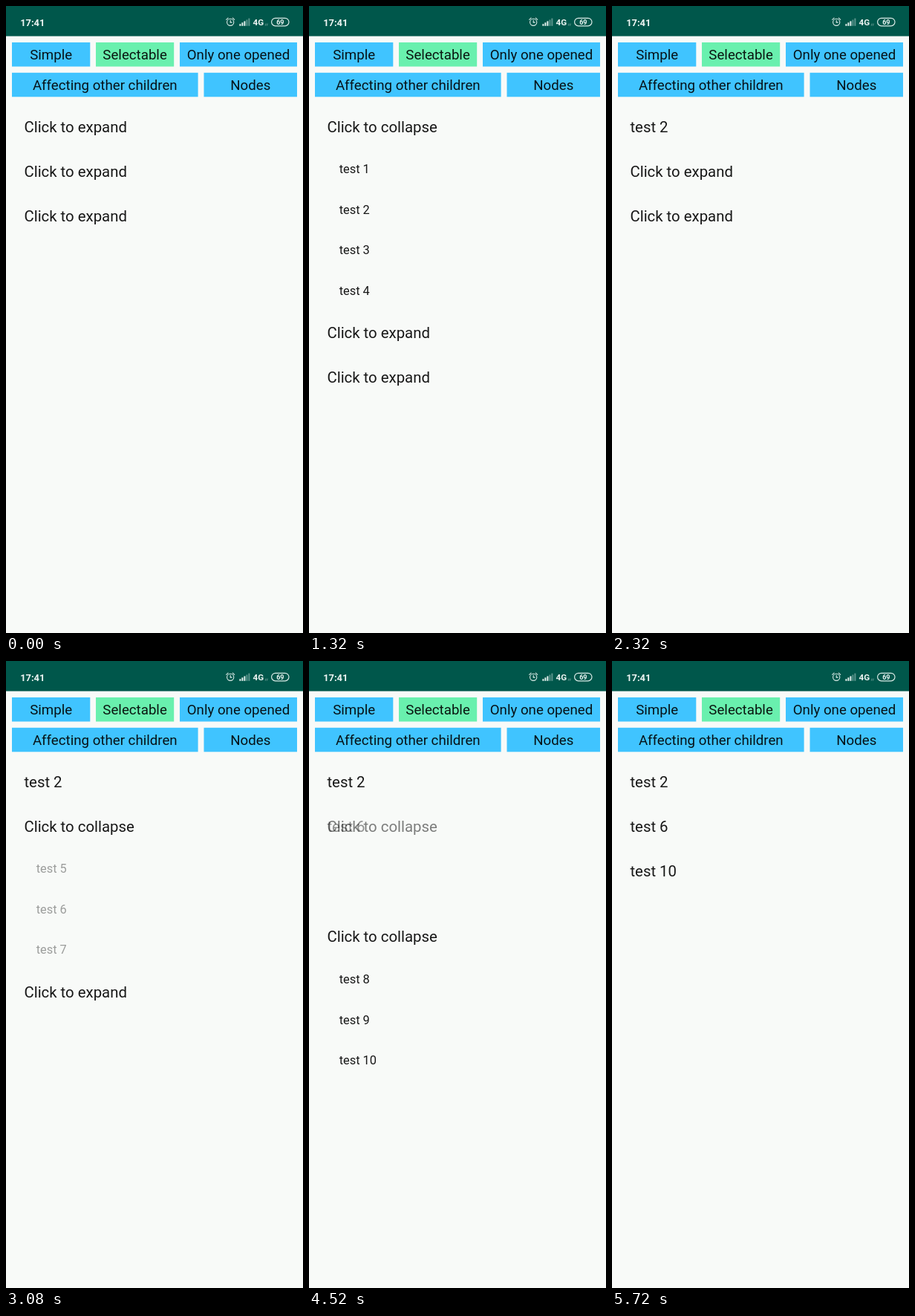
An HTML page for the animation above (7080 ms loop, 400x844 px).

```html
<!DOCTYPE html>
<html lang="en">
<head>
<meta charset="utf-8">
<title>Expandable list</title>
<style>
  html, body { margin: 0; width: 100%; height: 100%; overflow: hidden; background: #f8faf8; }
  svg { display: block; width: 100%; height: 100%; }
  text { font-family: Roboto, sans-serif; fill: #000; fill-opacity: .91; white-space: pre; }
  .button { font-size: 18.7px; text-anchor: middle; }
  .header { font-size: 20.37px; }
  .child { font-size: 16.35px; }
  .status text { fill: #eef5f3; fill-opacity: 1; font-weight: 700; }
</style>
</head>
<body>
<svg id="stage" viewBox="0 0 400 844">
  <rect width="400" height="844" fill="#f8faf8"/>
  <rect width="400" height="40.6" fill="#00574b"/>
  <g class="status">
    <text x="19.2" y="26.5" font-size="12.9">17:41</text>
    <g fill="none" stroke="#dcebe7" stroke-width="1.1" stroke-linecap="round">
      <circle cx="302.2" cy="21.8" r="4.6"/>
      <path d="M302.2 19.3v2.8h2M296.7 18.4l2.4-2.2M307.7 18.4l-2.4-2.2"/>
    </g>
    <g id="bars" fill="#e4f0ed"></g>
    <text x="332.6" y="26.3" font-size="11.6">4G</text>
    <path d="M349.3 26.6l.9-3M351.4 26.6l.9-3" stroke="#7fa9a1" stroke-width=".8"/>
    <rect x="357.6" y="16.4" width="23.4" height="10.4" rx="5.2" fill="none" stroke="#dcebe7" stroke-width="1.2"/>
    <text x="369.3" y="24.9" font-size="9" text-anchor="middle">69</text>
  </g>
  <g id="buttons"></g>
  <g id="list"></g>
</svg>
<script>
const LOOP = 7080;
const HEADER_Y = 169.6, HEADER_STEP = 60;
const CHILD_OFFSET = 55.7, CHILD_STEP = 54.45;
const FADE = 120, MOVE = 250, OPEN_DELAY = 18;

const groups = [
  { first: 1, count: 4, pick: 2, open: 840, close: 1950 },
  { first: 5, count: 3, pick: 6, open: 2760, close: 4283 },
  { first: 8, count: 3, pick: 10, open: 3480, close: 5270 }
];
const $ = id => document.getElementById(id);

function add(parent, tag, attrs, content = '') {
  const node = document.createElementNS('http://www.w3.org/2000/svg', tag);
  for (const key in attrs) node.setAttribute(key, attrs[key]);
  node.textContent = content;
  parent.appendChild(node);
  return node;
}

function ease(time, start, duration) {
  const p = Math.min(1, Math.max(0, (time - start) / duration));
  return 0.5 - Math.cos(p * Math.PI) / 2;
}

function place(node, y, alpha) {
  node.setAttribute('y', y.toFixed(2));
  node.setAttribute('opacity', alpha.toFixed(3));
}

function build() {
  for (let i = 0; i < 5; i++) {
    const h = 2.6 + i * 1.9;
    add($('bars'), 'rect', { x: 314.4 + i * 3, y: 26.8 - h, width: 2, height: h, opacity: i < 3 ? 1 : 0.4 });
  }
  [
    ['Simple', 8, 49, 105.3],
    ['Selectable', 121, 49, 105.2],
    ['Only one opened', 234, 49, 158],
    ['Affecting other children', 8, 89.8, 250.6],
    ['Nodes', 266.5, 89.8, 125.5]
  ].forEach(([label, x, y, width]) => {
    const fill = label === 'Selectable' ? '#69f0ae' : '#40c4ff';
    add($('buttons'), 'rect', { x, y, width, height: 32.5, fill });
    add($('buttons'), 'text', { class: 'button', x: x + width / 2, y: y + 23.2 }, label);
  });
  for (const g of groups) {
    const list = $('list');
    g.label = add(list, 'text', { class: 'header', x: 24.44 });
    g.choice = add(list, 'text', { class: 'header', x: 24.44 }, 'test ' + g.pick);
    g.children = Array.from({ length: g.count }, (_, i) =>
      add(list, 'text', { class: 'child', x: 40.74 }, 'test ' + (g.first + i)));
  }
}

function update(t) {
  let y = HEADER_Y;
  groups.forEach((g, i) => {
    const openStart = g.open + OPEN_DELAY;
    const isLast = i === groups.length - 1;
    const swap = ease(t, g.close + FADE, MOVE);
    // Rows below slide away first; the last group has none to wait for.
    const shown = ease(t, openStart + (isLast ? 0 : MOVE), FADE) - ease(t, g.close, FADE);
    const label = t < g.open ? 'Click to expand' : 'Click to collapse';
    if (g.label.textContent !== label) g.label.textContent = label;
    place(g.label, y, 1 - swap);
    place(g.choice, y, swap);
    g.children.forEach((child, k) => place(child, y + CHILD_OFFSET + k * CHILD_STEP, shown));
    y += HEADER_STEP + g.count * CHILD_STEP * (ease(t, openStart, MOVE) - swap);
  });
}

build();
const begin = performance.now();
function tick() {
  update((performance.now() - begin) % LOOP);
  requestAnimationFrame(tick);
}
tick();
</script>
</body>
</html>
```
